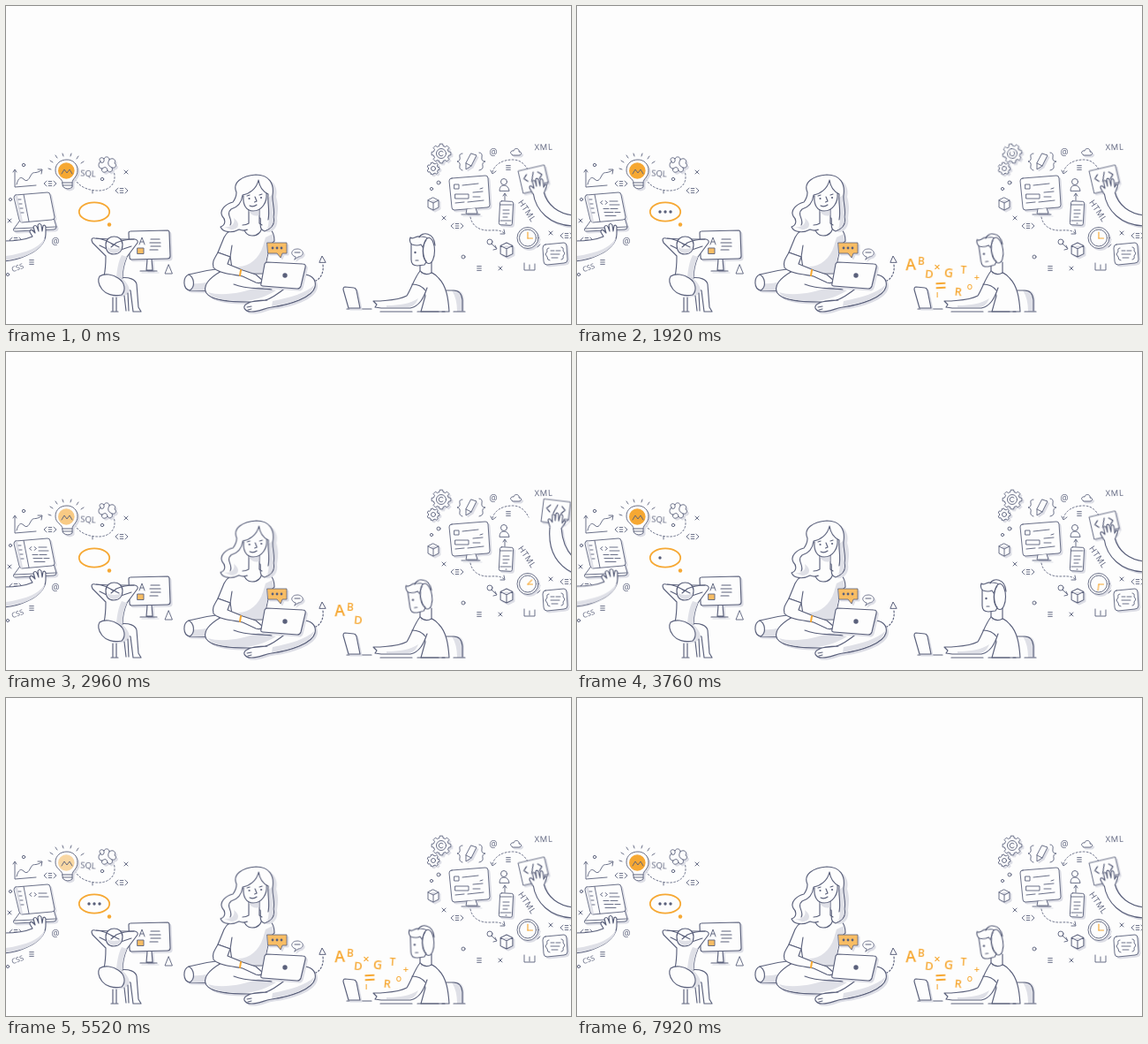
These frames come from a looping animation (640x360 px, 8 s). An HTML page:

```html
<!DOCTYPE html>
<html lang="en">
<head>
<meta charset="utf-8">
<title>Coding team</title>
<style>
html, body { margin: 0; width: 100%; height: 100%; overflow: hidden; background: #fdfdfd; }
svg { display: block; width: 100vw; height: 100vh; }
.art { fill: none; stroke: #5a607b; stroke-width: .9; stroke-linecap: round; stroke-linejoin: round; }
.bold { stroke-width: 1.15; }
.w { fill: #fdfdfd; }
.g { fill: #dfe0e7; stroke: none; }
.k { fill: #5a607b; stroke: none; }
.o { fill: #f6a833; stroke: none; }
.ol { stroke: #f6a833; }
.sh { filter: drop-shadow(2px 2px 0 #dcdde5); }
.dash { stroke-dasharray: 1.8 2.2; }
text { font-family: "Open Sans", "Noto Sans", sans-serif; fill: #5a607b; stroke: none; text-anchor: middle; }
#letters text { fill: #f6a833; font-weight: 600; }

#glow, #gear1, #gear2, #paper, #hand, #arm, #minute, #head, #girl { animation: 8s linear infinite; }
#gear1, #gear2 { animation-name: gear; }
#minute { animation-name: minute; }
#glow, #paper, #hand, #arm, #head, #girl { animation-timing-function: ease-in-out; }
#glow { animation-name: glow; }
#paper { animation-name: paper; }
#hand { animation-name: hand; }
#arm { animation-name: arm; }
#head { animation-name: nod; transform-origin: 474px 298px; }
#girl { animation-name: sway; transform-origin: 282px 242px; }

@keyframes glow {
  0%, 33.7%, 46.8%, 60%, 73.1%, 86.2%, 100% { opacity: 1; }
  40.3%, 53.4%, 66.5%, 79.6% { opacity: .2; }
}
@keyframes gear { 0%, 1% { transform: rotate(0); } 33%, 100% { transform: rotate(360deg); } }
@keyframes paper {
  0%, 3%, 21%, 28%, 44%, 100% { transform: translate(598px, 196px) rotate(-13deg); }
  11%, 14%, 33%, 37.5% { transform: translate(623px, 181px) rotate(7deg); }
}
@keyframes hand {
  0%, 3%, 21%, 28%, 44%, 100% { transform: translate(602px, 205px) rotate(-6deg); }
  11%, 14%, 33%, 37.5% { transform: translate(623px, 192px) rotate(6deg); }
}
@keyframes arm {
  0%, 3%, 21%, 28%, 44%, 100% { d: path("M597 211C600 232 616 248 642 249L642 237C626 235 613 226 609 210"); }
  11%, 14%, 33%, 37.5% { d: path("M616 199C614 222 622 240 642 250L642 232C634 224 630 213 629 199"); }
}
@keyframes minute {
  0%, 4% { transform: rotate(0); }
  24%, 34% { transform: rotate(360deg); }
  59%, 100% { transform: rotate(720deg); }
}
@keyframes nod {
  0%, 12%, 46%, 66% { transform: rotate(0); }
  18%, 38%, 75%, 80%, 87.5%, 100% { transform: rotate(-8deg); }
  83.5% { transform: rotate(-5deg); }
}
@keyframes sway {
  0%, 25%, 50%, 75%, 100% { transform: rotate(0); }
  12%, 38%, 62%, 90% { transform: rotate(.7deg); }
}
</style>
</head>
<body>
<svg viewBox="0 0 640 360" preserveAspectRatio="none">
<defs>
  <path id="tag" stroke-width=".9" d="M-4-2.8-7 0-4 2.8M4-2.8 7 0 4 2.8M-1.8-2.5H1.8M-1.8 0H1.8M-1.8 2.5H1.8"/>
  <path id="x" d="M-2-2 2 2M2-2-2 2"/>
  <path id="bars" d="M-2.3-2.4H2.3M-2.3 0H2.3M-2.3 2.4H2.3"/>
  <path id="cube" d="M0-7 6-4V4L0 7-6 4V-4ZM-6-4 0-1 6-4M0-1V7"/>
</defs>

<!-- left icons -->
<g class="art">
  <path d="M10 186V205L34 203M8 188 10 185 12 188M12 202C14 194 17 193 20 196S25 198 28 192 33 191 40 186M36 185 41 185 40 190"/>
  <circle cx="20" cy="180" r="1.7"/>
  <circle cx="5" cy="219" r="1.6"/>
  <circle cx="2" cy="304" r="1.6"/>
  <circle cx="109" cy="196" r="1.7"/>
  <use href="#tag" x="50" y="201"/>
  <use href="#tag" x="131" y="209"/>
  <use href="#tag" x="11" y="265"/>
  <use href="#x" x="136" y="188"/>
  <use href="#x" x="4" y="243"/>
  <use href="#bars" x="29" y="290"/>
  <path class="dash" d="M78 196C84 206 95 209 105 209S123 203 123 194 121 188 119 187"/>
  <path d="M98 209V212"/>
  <g class="sh">
    <path class="w" d="M64 200C64 195 56 194 56 186 56 178 62 174 69 174S81 179 81 186C81 194 75 195 75 200Z"/>
    <path class="w" d="M64 200H75V205Q70 209 65 205ZM64 203H75"/>
  </g>
  <circle id="glow" class="o" cx="68.3" cy="186.5" r="9.3"/>
  <path d="M63 190 66 185 69 189 72 185 75 190"/>
  <path d="M51 185 48 184M53 177 50 175M58 172 56 169M65 170 64 167M73 170 74 167M80 173 82 170M85 178 88 176"/>
  <g class="sh"><path class="w" d="M107 176C104 173 108 170 111 173 112 170 117 170 117 174 121 171 125 174 123 178 126 180 124 184 120 183 122 187 117 190 115 186 112 190 107 188 109 184 104 184 104 178 107 176Z"/>
    <path d="M111 173Q112 179 107 177M117 174Q113 180 120 183M109 184Q114 180 115 186"/></g>

  <g class="sh">
    <path class="w" d="M16 243 54 240 57 250Q57 253 54 253L11 255Q7 255 9 252Z"/>
    <path class="w" d="M11 214 47 211Q50 211 50 214L55 239Q55 242 52 242L18 245Q16 245 15 242L9 217Q9 214 11 214Z"/>
  </g>
  <path class="g" d="M10 215 13 214 19 244 17 245Z"/>
  <path d="M20 213.5 26 244M14 219H17M15 224H18M16 229H19M17 234H20M9 252 57 250"/>
  <g id="code"><path d="M29 220.5 26.500 222.500 29 224.500M32 220.500 34.500 222.500 32 224.500"/><path d="M37 221H46"/><path d="M37 225H48"/><path d="M30 229.500H36M38 229.500H46"/><path d="M31 233.500H41M43 233.500H49"/><path d="M32 237.500H44"/></g>
  <g id="typing" class="bold">
    <path class="w" d="M-2 266C12 266 23 264 30 261L27 256Q27 252 30 254L33 257 31 250Q33 247 35 250L37 255 36 248Q38 245 40 248L41 255 42 249Q44 247 45 250L45 258C45 268 36 277 24 282 16 286 7 288-2 289Z"/>
    <path class="g" d="M44 262C40 272 24 280-1 283V288C20 287 44 275 44 262Z"/>
  </g>
</g>
<text x="93" y="193" font-size="9.5" transform="rotate(4 93 190)">SQL</text>
<text x="13" y="299" font-size="8" transform="rotate(-20 13 296)">CSS</text>
<text x="56" y="270" font-size="10">@</text>

<!-- relaxed developer -->
<g class="art">
  <ellipse class="ol" cx="100" cy="233" rx="17.2" ry="10.7" stroke-width="1.8"/>
  <circle class="o" cx="117" cy="247.5" r="2.2"/>
  <g id="dots"><circle class="k" cx="94" cy="233" r="1.7"/><circle class="k" cx="100" cy="233" r="1.7"/><circle class="k" cx="106" cy="233" r="1.7"/></g>
  <g class="sh bold">
    <path class="w" d="M141 255 183 254Q185 254 185 257L186 283Q186 286 183 286L142 287Q140 287 140 284L139 257Q139 255 141 255Z"/>
    <path class="w" d="M160 287 159 299H166L165 287M152 300H171"/>
  </g>
  <path stroke-width="1.2" d="M164 264H174M163 268H175M164 272H175M163 276H172"/>
  <path d="M151 270 154 262 157 270M152 267H156M184 293 180 303H188Z"/>
  <path fill="#f8bd64" d="M149 274H156V280.500H149Z"/>
  <g class="bold">
    <path class="w" d="M128 308C140 306 147 310 148 315L150 341 153 346H144L141 322 130 320"/>
    <path class="w" d="M97 265Q97 262 101 263L117 264H129L146 264Q150 265 149 268L137 284C134 291 132 298 132 308L111 306C113 297 113 290 113 283L98 268Z"/>
    <path class="g" d="M131 282 137 284C134 291 132 298 132 308L125 307C126 298 127 290 131 282Z"/>
    <path d="M106 271 116 276M142 272 130 276"/>
    <path class="w" d="M113 270C113 258 132 258 132 270 132 277 128 281 122 281S113 277 113 270Z"/>
    <path class="g" d="M114 273Q123 277 131 273 129 281 122 280 116 280 114 273Z"/>
    <path d="M102 263Q113 264 121 270M145 264Q134 264 125 268L119 273M116 267 128 273"/>
    <path class="g" d="M118 304C130 304 139 314 140 322 139 328 129 331 121 329Z"/>
    <path class="w" d="M106 306C112 302 121 304 127 308 135 313 136 322 131 327 121 329 113 326 109 321 104 315 104 309 106 306Z"/>
    <path d="M121 330V345M125 330V345M134 328 136 345M138 325 139 345M119 346H127"/>
  </g>
</g>

<!-- woman -->
<g class="art bold">
  <g class="sh"><path class="w" d="M207 304C200 307 200 320 208 322L252 323V296C234 298 219 301 207 304Z"/></g>
  <path class="g" d="M212 314C222 315 232 312 242 309L232 322H210Z"/>
  <path d="M207 304C213 307 215 318 208 322"/>
  <g class="sh">
    <path class="w" d="M244 300C230 308 222 317 227 325 233 334 256 335 276 335L296 333C288 333 279 333 273 337 267 340 270 346 278 346 287 346 293 342 301 341 322 338 347 330 350 318 352 309 345 303 334 304L290 302Z"/>
  </g>
  <path class="g" d="M229 324C244 329 267 325 286 318L306 322C296 328 284 333 270 334 250 334 233 332 229 324ZM302 334C322 330 340 325 349 316 346 330 322 337 301 340Z"/>
  <path d="M258 315C272 321 288 319 301 321M318 318C308 326 301 331 294 333M273 341 278 340M274 344 278 343"/>
  <path class="w" d="M268 248C257 251 250 255 247 262L240 279 254 284 257 303H292L299 270 304 266C304 256 300 250 290 248 290 256 285 260 279 260S269 255 268 248Z"/>
  <path class="g" d="M257 294C272 298 286 288 291 272L294 262 302 258 303 266 299 270 291 302H258Z"/>
  <path d="M256 271 254 284"/>
  <path class="w" d="M240 279C236 286 233 290 235 296 240 303 259 304 268 306L283 313Q289 315 291 311L283 304 268 299 251 292 254 284Z"/>
  <path class="ol" d="M266 299 265 305" stroke-width="2"/>
  <g id="girl">
    <path class="g" d="M292 194C306 198 308 209 306 216 309 226 308 233 307 240 309 250 302 257 295 256L290 240Z"/>
    <path class="w" d="M261 211C256 200 267 192 283 191 298 191 304 201 302 214 301 223 305 229 303 239 305 247 301 252 293 255 286 253 289 246 288 240L276 240C281 248 274 257 264 253 257 257 246 257 243 250 249 248 249 242 245 238 241 231 249 224 257 222 260 218 261 215 261 211Z"/>
    <path class="g" d="M296 218C297 230 300 237 296 253 304 249 303 242 302 236 303 228 300 221 301 214ZM247 250C256 251 260 246 258 240 266 246 264 253 255 253Z"/>
    <path class="w" stroke="none" d="M275 228H287V249Q281 258 270 251L268 248 275 246Z"/>
    <path d="M275 231V246Q272 248 268 248M287 230V246L290 248"/>
    <path class="g" d="M275.500 231Q281 235 286.500 230V237Q280 239 275.500 233Z"/>
    <path class="w" stroke="none" d="M268 214C267 224 271 232 280 232 291 231 296 222 295 211L286 197Z"/>
    <path d="M269 215C268 225 272 232 280 232 290 232 296 222 295 212M286 197C284 207 275 213 268 214 267 222 262 228 255 230M286 197C287 205 291 210 297 213 296 224 299 230 297 242M255 230C248 236 258 242 254 248M282 216 284 221 281.500 222M276 226Q280 228 284 225M273 215 276 214M287 214 290 213"/>
    <circle class="k" cx="275.500" cy="218" r="1.100"/><circle class="k" cx="289" cy="217" r="1.100"/>
  </g>
  <g class="sh"><path class="w" d="M296 290 336 292Q340 292 339 296L334 317Q333 320 330 320L291 317Q288 317 289 314L293 292Q294 290 296 290Z"/></g>
  <circle class="k" cx="316" cy="305" r="2.700"/>
  <g class="sh" stroke-width=".8"><path fill="#f8bd64" d="M296 268H318V280H313L311 285 307 280H297Z"/>
    <path class="w" d="M328 284C321 282 323 275 330 275S339 283 331 284L327 287Z"/></g>
  <circle class="k" cx="302" cy="274" r="1.400"/><circle class="k" cx="307" cy="274" r="1.400"/><circle class="k" cx="312" cy="274" r="1.400"/>
  <path stroke-width="1" d="M327 279H333M355 290 358 283 362 290Z"/>
  <path class="dash" d="M359 293C360 301 357 308 351 311"/>
</g>

<!-- man with headphones -->
<g class="art bold">
  <path class="g" d="M505 322C515 320 519 326 519 334V346H511Q511 331 505 322Z"/>
  <path d="M497 322H507Q516 322 517 333V345"/>
  <path class="w" d="M469 300C479 299 486 303 490 308 499 317 501 331 502 346H470L475 328Z"/>
  <path class="w" stroke="none" d="M468 288V301Q475 306 483 301L481 286Z"/>
  <path d="M469 293V300Q475 306 482 302V290"/>
  <path class="w" d="M469 300C463 307 459 320 454 328 445 333 434 333 424 334H416L420 338 418 341 425 342H458C468 340 473 331 477 319"/>
  <path d="M460 315C466 315 472 318 475 322"/>
  <path class="g" d="M431 339C446 339 458 337 467 331 464 338 460 341 455 341H431Z"/>
  <path d="M386 343H414M424 346H460M466 346H490M494 346H497M507 346H520"/>
  <g class="sh"><path class="w" d="M384 318 394 319Q396 319 397 322L401 342H388L382 321Q382 318 384 318Z"/></g>
  <g id="head">
    <path class="w" d="M459 269V287Q459 294 466 294L474 293 482 280 480 264H468Z"/>
    <path class="w" d="M460 270C457 268 457 265 458 262 461 265 463 260 470 261 478 261 484 266 485 274L474 276 470 270C466 272 463 271 460 270Z"/>
    <path d="M468 262C471 255 485 256 486 271"/>
    <ellipse class="w" cx="479" cy="277" rx="6.500" ry="14.500"/>
    <path d="M476 265C471 271 471 284 476 289M464 288 467 288"/>
    <circle class="k" cx="463.500" cy="279" r="1.200"/>
  </g>
</g>
<g id="letters"></g>

<!-- right icons -->
<g class="art">
  <g transform="translate(493 167)" class="sh"><g id="gear1"><path class="w"/><circle r="5.500"/><path d="M2-2A2.800 2.800 0 1 0 2 2"/></g></g>
  <g transform="translate(484 184)" class="sh"><g id="gear2"><path class="w"/><circle r="2.500"/></g></g>
  <path d="M517 167Q513 167 514 171T511 176Q515 177 514 181T517 186M536 166Q540 166 539 171T543 176Q539 177 540 181T536 186"/>
  <g class="sh"><path class="w" d="M527 167 533 169 527 181 521 185 521 178ZM521 178 527 181"/></g>
  <g class="sh"><path class="w" d="M573 168C570 167 572 163 575 164 576 160 582 161 581 165 585 165 584 169 581 169H574Z"/></g>
  <path class="dash" d="M551 188C554 178 564 174 574 174S589 181 592 187"/>
  <path d="M549 186 551 190 555 187"/>
  <use href="#bars" x="569" y="183"/>
  <circle cx="490" cy="200" r="2"/><circle cx="482" cy="207" r="1.600"/><circle cx="518" cy="284" r="2"/>
  <g class="sh"><use href="#cube" class="w" x="484" y="224"/></g>
  <use href="#x" x="496" y="240"/><use href="#x" x="560" y="297"/><use href="#x" x="617" y="257"/>
  <use href="#bars" x="536" y="297"/>
  <use href="#tag" x="511" y="249"/><use href="#tag" x="635" y="260"/>
  <g class="sh">
    <path class="w" d="M505 195 543 192Q546 192 546 195L548 225Q548 228 545 228L508 231Q505 231 505 228L502 198Q502 195 505 195Z"/>
    <path class="w" d="M522 230 521 235H534L532 229M516 236H537"/>
  </g>
  <path d="M508 202H513V207H508ZM517 203 535 201M537 207 540 206M509 213H524V218H509ZM529 211 540 210M529 216H537M509 223 519 222M523 222 541 220"/>
  <circle class="w" cx="564" cy="199" r="3.500"/><path class="w" d="M559 209Q559 203 564 203T570 209Z"/>
  <path d="M565 220V213M563 215 565 212 567 215"/>
  <g class="sh"><rect class="w" x="559" y="221" width="15" height="27" rx="2" transform="rotate(3 566 234)"/></g>
  <path d="M560 225H573M563 231H570M563 235H570M563 239H568M560 243H572M566 246H567"/>
  <path class="dash" d="M526 239C528 249 536 254 546 254 553 254 560 253 564 257"/>
  <path d="M564 253 565 258 560 258"/>
  <circle class="w" cx="548" cy="267" r="3"/><path d="M550 269 555 274M554 271 556 275 552 276"/>
  <g class="sh"><g transform="translate(567 276) scale(1.15)"><use href="#cube" class="w"/></g></g>
  <g class="sh"><circle class="w" cx="591" cy="262.500" r="12"/></g>
  <circle cx="591" cy="262.500" r="9.500"/>
  <g class="ol bold" transform="translate(591 263)"><path d="M0 0H5.500"/><path id="minute" d="M0 0V-7"/></g>
  <path d="M587 291V299H599V292M593 293V298M602 273 605 270"/>
  <g class="sh"><path class="w" d="M611 270 632 268Q635 268 635 272L636 287Q636 291 632 291L613 293Q609 293 609 289L608 274Q608 270 611 270Z"/></g>
  <path d="M615 274Q612 274 613 278L611 281 613 284Q613 288 616 288M629 273Q632 273 631 277L633 280 631 283Q632 287 629 287M617 277H621M623 277H628M617 281H627M618 285H625"/>
  <g class="sh"><g id="paper">
    <path class="w" d="M-15-13H15V7L10 13H-15ZM15 7H10V13"/>
    <path class="bold" d="M-7-7-11-3-7 1M6-7 10-3 6 1M1-8-3 2"/>
  </g></g>
  <g class="bold">
    <g class="sh"><path id="arm" class="w" d="M597 211C600 232 616 248 642 249L642 237C626 235 613 226 609 210"/></g>
    <g id="hand"><path class="w" d="M-6 7-9 0Q-9-3-7-2L-4 1-5-7Q-4-9-2-7L-1-1-1-9Q1-11 2-8L3-1 4-8Q6-10 7-7L7 1 9-2Q11-3 10 1L7 7"/></g>
  </g>
</g>
<text x="552" y="169" font-size="10">@</text>
<text x="609" y="163" font-size="9.5" letter-spacing=".6" transform="rotate(-2 609 160)">XML</text>
<text x="590" y="235" font-size="9.5" letter-spacing=".5" transform="rotate(56 590 232)">HTML</text>
</svg>
<script>
const LOOP = 8000;
const $ = id => document.getElementById(id);

// Switches between two states at the given times, starting with the first
function toggle(el, times, off = { opacity: 0 }, on = { opacity: 1 }) {
  const frames = [0, ...times, LOOP].map((t, i) =>
    ({ ...(i % 2 && t < LOOP ? on : off), offset: t / LOOP, easing: 'step-end' }));
  el.animate(frames, { duration: LOOP, iterations: Infinity });
}

function gearPath(r, teeth) {
  const pts = [];
  for (let i = 0; i < teeth; i++) {
    [[-.3, .8], [-.2, 1], [.2, 1], [.3, .8]].forEach(([a, k]) => {
      const q = (i + a) / teeth * Math.PI * 2;
      pts.push((Math.cos(q) * r * k).toFixed(2) + ' ' + (Math.sin(q) * r * k).toFixed(2));
    });
  }
  return 'M' + pts.join('L') + 'Z';
}
$('gear1').firstElementChild.setAttribute('d', gearPath(11, 8));
$('gear2').firstElementChild.setAttribute('d', gearPath(7, 7));

// character, centre, size, tilt
const glyphs = [
  ['A', 378, 293, 18, -3], ['B', 390, 289, 12, 4], ['D', 399, 303, 13, 6], ['×', 408, 295, 13, 0],
  ['G', 421, 302, 14, 8], ['=', 412, 317, 23, -3], ['I', 408, 327, 9, 0], ['R', 432, 323, 13, 6],
  ['O', 445, 318, 8, 0], ['T', 438, 299, 12, 4], ['+', 453, 307, 11, 0]
];
glyphs.forEach(([s, x, y, size, tilt], i) => {
  const el = document.createElementNS('http://www.w3.org/2000/svg', 'text');
  el.textContent = s;
  el.setAttribute('y', size * .36);
  el.setAttribute('font-size', size);
  el.setAttribute('transform', `translate(${x} ${y}) rotate(${tilt})`);
  $('letters').append(el);
  toggle(el, [390 + 80 * i, 3150 - 70 * i, 3910 + 80 * i]);
});

[...$('dots').children].forEach((el, i) => {
  const times = [0, 3000, 6000].flatMap(t => [t + 600 + 300 * i, t + 2600]);
  toggle(el, times.filter(t => t < LOOP));
});

[...$('code').children].forEach((el, i) =>
  toggle(el, [300 + 180 * i, 6000 - 180 * i, 7150 + 120 * i]));

const taps = [];
for (let t = 160; t < 7900; t += 160) {
  if (t < 2600 || (t > 3600 && t < 6100) || t > 7100) taps.push(t);
}
if (taps.length % 2) taps.pop();
toggle($('typing'), taps, { transform: 'translate(0,0)' }, { transform: 'translate(.8px,-.8px)' });
</script>
</body>
</html>
```
